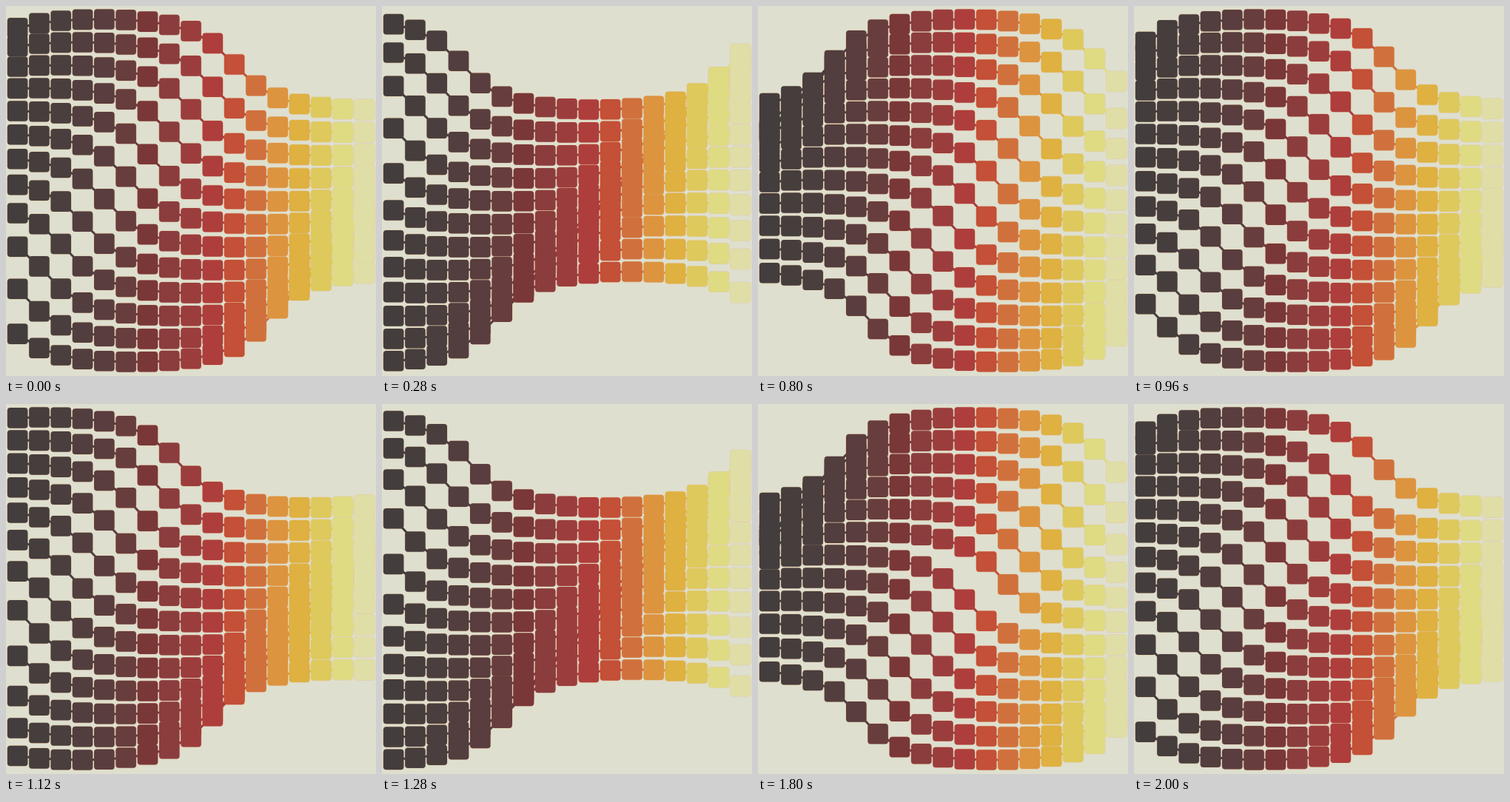
These frames come from a looping animation (500x500 px, 2.04 s). An HTML page:

```html
<!DOCTYPE html>
<html lang="en">
<head>
<meta charset="utf-8">
<title>Wave of squares</title>
<style>
  html, body { margin: 0; width: 100%; height: 100%; overflow: hidden; background: #dedfcf; }
  svg { display: block; width: 100vw; height: 100vh; }
</style>
</head>
<body>
<svg id="stage" viewBox="0 0 500 500"></svg>
<script>
const COLORS = ['#443d3d', '#463d3d', '#4a3e3e', '#523e3e', '#5a3d3e', '#683d3d', '#7a3738',
  '#8b3d3e', '#9c3d3d', '#ae3e3c', '#c35037', '#d0713d', '#dc943f', '#deb140', '#dec95c',
  '#dedb82', '#dfdea6'];
const EDGE = '#e8b888';
const ROWS = 12, COLS = COLORS.length;
const SIZE = 27.6, COL_STEP = 29.3, ROW_STEP = 31;
const FRAME_MS = 40, FRAMES = 51;

// The wave length is measured in columns, the speed in columns per frame.
const WAVE = { length: 24.82, speed: 0.979, start: 10, mid: 79, height: 61, steep: 2.5 };

const stage = document.getElementById('stage');
const colX = col => 250 + (col - (COLS - 1) / 2) * COL_STEP;

function add(tag, attrs) {
  const node = document.createElementNS('http://www.w3.org/2000/svg', tag);
  for (const name in attrs) node.setAttribute(name, attrs[name]);
  return stage.appendChild(node);
}

function grid(cols, make) {
  return Array.from({ length: ROWS }, () => Array.from({ length: cols }, (_, col) => make(col)));
}

function addSquare(col, paint) {
  return add('rect', { x: colX(col) - SIZE / 2, width: SIZE, height: SIZE, rx: 4, ...paint });
}

// Layers from back to front: warm edges, links, squares.
const edges = grid(COLS, col => addSquare(col, {
  fill: 'none', stroke: EDGE, 'stroke-width': 1.2, 'stroke-opacity': 0.5
}));
const links = grid(COLS - 1, col => add('line', {
  x1: colX(col), x2: colX(col + 1), stroke: COLORS[col], 'stroke-width': 3
}));
const squares = grid(COLS, col => addSquare(col, { fill: COLORS[col] }));

// Each row runs one frame ahead of the row above; the last frame wraps to the second.
function rowFrame(row, frame) {
  const ahead = frame + row;
  return ahead < FRAMES ? ahead : ahead - (FRAMES - 1);
}

// A sine flattened at its crests by an arctangent.
function squareY(row, col, frame) {
  const shift = col - WAVE.start + WAVE.speed * rowFrame(row, frame);
  const sine = Math.sin(2 * Math.PI * shift / WAVE.length);
  const level = Math.atan(WAVE.steep * sine) / Math.atan(WAVE.steep);
  return WAVE.mid + row * ROW_STEP + WAVE.height * level;
}

function draw(time) {
  const frame = Math.floor(time / FRAME_MS) % FRAMES;
  for (let row = 0; row < ROWS; row++) {
    const ys = COLORS.map((_, col) => squareY(row, col, frame));
    ys.forEach((y, col) => {
      edges[row][col].setAttribute('y', y - SIZE / 2);
      squares[row][col].setAttribute('y', y - SIZE / 2);
    });
    links[row].forEach((link, col) => {
      link.setAttribute('y1', ys[col]);
      link.setAttribute('y2', ys[col + 1]);
    });
  }
}

const begin = performance.now();
function tick() {
  draw(performance.now() - begin);
  requestAnimationFrame(tick);
}
tick();
</script>
</body>
</html>
```
